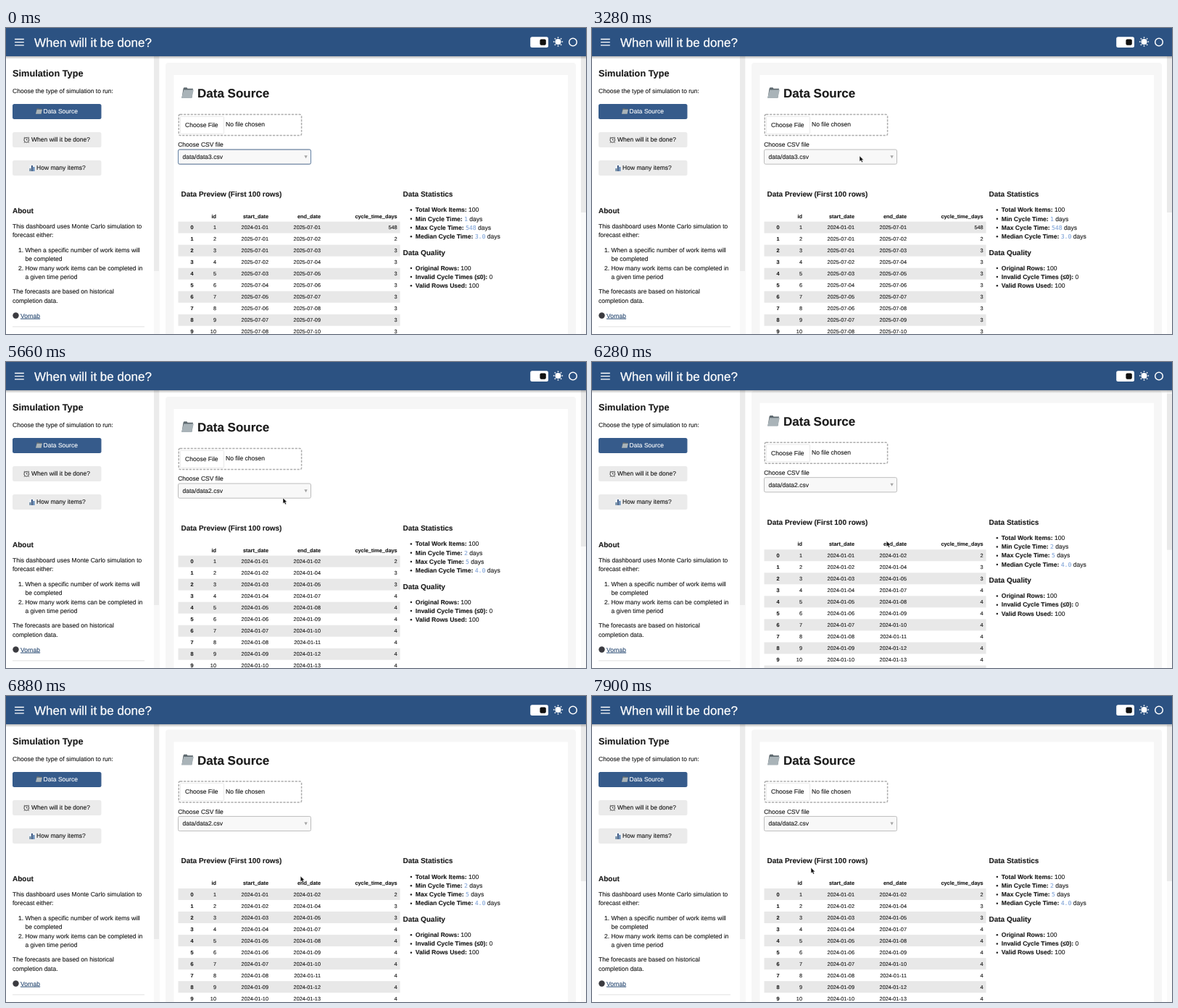
Recreate the animation shown at these times as an HTML page. Size 800x423 px, loop 8000 ms.

```html
<!DOCTYPE html>
<html lang="en">
<head>
<meta charset="utf-8">
<title>When will it be done?</title>
<style>
  html, body { margin: 0; width: 100%; height: 100%; overflow: hidden; background: #fff; }
  svg { display: block; width: 100%; height: 100%; }
  text {
    font: 8.54px "Liberation Sans", Arial, sans-serif; fill: #1a1a1a; stroke: #1a1a1a; stroke-width: .12px;
    white-space: pre; text-rendering: geometricPrecision;
  }
  .b { font-weight: 700; }
  .h1 { font-size: 17px; font-weight: 700; }
  .h2 { font-size: 12.75px; font-weight: 700; }
  .h3 { font-size: 10px; font-weight: 700; }
  .title { font-size: 17.05px; stroke-width: .25px; }
  .cell { font-size: 7.32px; text-anchor: end; }
  .code { font: 8.15px "DejaVu Sans Mono", monospace; fill: #82a5d8; stroke: #82a5d8; }
  .light { fill: #fff; stroke: #fff; }
  .link { fill: #2b4c74; stroke: #2b4c74; text-decoration: underline; }
</style>
</head>
<body>
<svg id="stage" viewBox="0 0 800 423" preserveAspectRatio="none"></svg>
<script>
const LOOP = 8000, DATA_SWITCH = 4930, ROW = 16.02, FIRST_ROW = 267.6;

const rect = (x, y, w, h, fill, r = 0, extra = '') =>
  `<rect x="${x}" y="${y}" width="${w}" height="${h}" fill="${fill}" rx="${r}" ${extra}/>`;
const text = (x, y, content, cls = '') => `<text x="${x}" y="${y}" class="${cls}">${content}</text>`;
const pad = n => String(n).padStart(2, '0');

const folder = (x, y, scale) => `<g transform="translate(${x} ${y}) scale(${scale})">
  <path d="M2.500 2 3.500 .5H7.500L8.500 2H16L14.500 14.500H.5Z" fill="#5f6a70"/>
  <path d="M3.200 3.800H16.800L14.300 15.200H0Z" fill="#a9b3b8"/></g>`;

const clock = `<g stroke="#444" fill="#f4f4f4"><circle cx="28.300" cy="154.800" r="3.400"/>
  <path d="M28.300 152.600V155H30.200M25.800 157.800 25 158.800M30.800 157.800 31.600 158.800M24.600 152.200 26 150.800M32 152.200 30.600 150.800" fill="none" stroke-width=".9"/></g>`;

const chart = rect(31.5, 189.5, 8.5, 8.5, '#eef2f5', .5) + rect(32.5, 194, 1.8, 4, '#4a6f8c') +
  rect(35, 190, 1.8, 8, '#2d4a78') + rect(37.5, 192, 1.8, 6, '#3f6fa5');

function sidebar() {
  const lines = [
    [9, 276.8, 'This dashboard uses Monte Carlo simulation to'], [9, 289.2, 'forecast either:'],
    [17, 310, '1.'], [26.4, 310, 'When a specific number of work items will'], [26.4, 322.4, 'be completed'],
    [17, 334.6, '2.'], [26.4, 334.6, 'How many work items can be completed in'], [26.4, 347, 'a given time period'],
    [9, 367.3, 'The forecasts are based on historical'], [9, 379.6, 'completion data.']
  ];
  return rect(0, 39, 212, 384, '#fff') + rect(204, 39, 8, 384, '#f8f8f8') + rect(204, 39, 7, 297, '#ebebeb') +
    text(9, 67.3, 'Simulation Type', 'h2') + text(9, 89.6, 'Choose the type of simulation to run:') +
    rect(9, 105, 122.5, 21, '#365b8b', 2.5) + folder(41, 110.8, .53) + text(51.5, 118.2, 'Data Source', 'light') +
    rect(9, 144, 122.5, 21, '#ebebeb', 2.5) + clock + text(35, 157.4, 'When will it be done?') +
    rect(9, 183, 122.5, 21, '#ebebeb', 2.5) + chart + text(42, 196.4, 'How many items?') +
    text(9, 255.8, 'About', 'h3') + lines.map(l => text(...l)).join('') +
    '<circle cx="13.500" cy="397.500" r="4.200" fill="#3b3b40"/>' + text(20, 400.6, 'Vornab', 'link') +
    rect(9, 412.4, 182, 1, '#e2e2e2');
}

function header() {
  const rays = Array.from({ length: 8 }, (_, i) =>
    `<path d="M0 -5V-6.600" transform="rotate(${i * 45})"/>`).join('');
  return rect(0, 39, 800, 4, 'url(#shade)') + rect(0, 0, 800, 39, '#2c5282') +
    '<path d="M12 15.500H24.800M12 19.700H24.800M12 23.900H24.800" stroke="#fff" stroke-width="1.300"/>' +
    text(39, 25.8, 'When will it be done?', 'title light') +
    rect(723.2, 12.2, 24.8, 14.8, '#fff', 2.5) + rect(736.4, 15.4, 8.4, 8.4, '#111', 2) +
    `<g transform="translate(761.500 19)" stroke="#fff" stroke-width="1.500"><circle r="3.300" fill="#fff"/>${rays}</g>` +
    '<circle cx="782" cy="19.500" r="5.300" fill="none" stroke="#fff" stroke-width="1.500"/>';
}

const recent = i => i === 0 ? ['2024-01-01', '2025-07-01', 548]
  : i === 1 ? ['2025-07-01', '2025-07-02', 2]
  : [`2025-07-${pad(i - 1)}`, `2025-07-${pad(i + 1)}`, 3];

const steady = i => {
  const days = [2, 3, 3][i] || 4;
  return [`2024-01-${pad(i + 1)}`, `2024-01-${pad(i + days)}`, days];
};

function dataset(id, file, rowOf, stats) {
  let out = text(243.5, 181, file);
  for (let i = 0; i < 11; i++) {
    const y = 278.3 + i * ROW, [start, end, days] = rowOf(i);
    out += text(258.6, y, i, 'cell b');
    [[290, i + 1], [362, start], [434, end], [539.6, days]].forEach(([x, v]) => out += text(x, y, v, 'cell'));
  }
  ['Min', 'Max', 'Median'].forEach((name, i) => out += text(564.8, 266.5 + i * 12.25,
    `<tspan class="b">${name} Cycle Time:</tspan> <tspan class="code">${stats[i]}</tspan> days`));
  return `<g id="${id}">${out}</g>`;
}

function mainPanel() {
  const bullet = y => `<circle cx="558.800" cy="${y - 2.700}" r="1.250" fill="#222"/>`;
  const item = (y, label, value) => text(564.8, y, `<tspan class="b">${label}</tspan> ${value}`);
  const heads = [[290, 'id'], [362, 'start_date'], [434, 'end_date'], [539.6, 'cycle_time_days']];
  const stripes = [0, 2, 4, 6, 8, 10].map(i => rect(237.5, FIRST_ROW + i * ROW, 306, ROW, '#e8e8e8')).join('');
  return rect(220, 48, 566, 400, '#f6f6f6', 4) + rect(231.5, 65, 543.5, 400, '#fff') +
    folder(242, 81.8, 1) + text(264, 96.3, 'Data Source', 'h1') +
    rect(238.3, 119.6, 169.3, 29, 'none', 2, 'stroke="#adadad" stroke-width="1.500" stroke-dasharray="3.200 1.600"') +
    rect(240.5, 122.3, 60, 24, '#fff', 1, 'stroke="#e4e4e4" stroke-width=".8"') +
    text(247, 136.9, 'Choose File') + text(303, 136.3, 'No file chosen') +
    text(237.2, 164.3, 'Choose CSV file') +
    rect(237.5, 168, 183, 20.2, '#f8f8f8', 2, 'stroke="#bdbdbd"') +
    rect(237.5, 168, 183, 20.2, 'none', 2, 'id="focus" stroke="#6482a6"') +
    '<path d="M411.400 176.200H415.800L413.600 180.200Z" fill="#a3a3a3"/>' +
    text(241.5, 233, 'Data Preview (First 100 rows)', 'h3') +
    heads.map(([x, s]) => text(x, 262.6, s, 'cell b')).join('') + stripes +
    rect(237.5, 0, 306, ROW, '#d5e9f8', 0, 'id="hover"') +
    text(547.5, 233, 'Data Statistics', 'h3') + text(547.5, 313.6, 'Data Quality', 'h3') +
    [254.2, 266.5, 278.7, 291, 334.6, 346.8, 359].map(bullet).join('') +
    item(254.2, 'Total Work Items:', 100) + item(334.6, 'Original Rows:', 100) +
    item(346.8, 'Invalid Cycle Times (≤0):', 0) + item(359, 'Valid Rows Used:', 100) +
    dataset('before', 'data/data3.csv', recent, ['1', '548', '3.0']) +
    dataset('after', 'data/data2.csv', steady, ['2', '5', '4.0']);
}

const $ = id => document.getElementById(id);
$('stage').innerHTML = `<defs><linearGradient id="shade" x2="0" y2="1">
  <stop stop-color="#000" stop-opacity=".28"/><stop offset="1" stop-color="#000" stop-opacity="0"/></linearGradient></defs>` +
  rect(0, 0, 800, 423, '#fff') + `<g id="main">${mainPanel()}</g>` +
  rect(793, 39, 7, 384, '#fafafa') + rect(793, 39, 7, 216, '#e9e9e9', 0, 'id="thumb"') +
  sidebar() + header() +
  '<path id="cursor" d="M0 0V7.800L1.800 6.200 3.100 9 4.600 8.300 3.300 5.600H5.700Z" fill="#111" stroke="#fff" stroke-width=".5"/>';

// Each key is [time, ...values]; values glide between keys.
function sample(keys, t) {
  const next = keys.findIndex(k => k[0] > t);
  if (next === 0) return keys[0].slice(1);
  if (next < 0) return keys[keys.length - 1].slice(1);
  const a = keys[next - 1], b = keys[next], p = (t - a[0]) / (b[0] - a[0]);
  const eased = p * p * (3 - 2 * p);
  return a.slice(1).map((v, i) => v + (b[i + 1] - v) * eased);
}

const pointerKeys = [
  [1070, 305, 420], [1510, 354, 164.5], [1790, 369, 176.8], [4930, 369, 176.8], [5660, 382, 188],
  [5740, 384, 191], [6080, 406.2, 246.5], [6540, 406.2, 249], [6880, 406.2, 249],
  [7590, 290, 377], [7693, 288, 330], [7796, 287, 270], [7899, 302, 237.3]
];
const scrollKeys = [[5740, 0], [6140, 8.4], [6380, 8.3], [6540, 1.6]];
const focusKeys = [[2040, 1], [2260, 0]];

function draw(t) {
  // The last pointer moves land in coarse steps.
  const pointerTime = t > 7590 ? 7590 + Math.floor((t - 7590) / 103) * 103 : t;
  const [x, y] = sample(pointerKeys, pointerTime);
  const [scroll] = sample(scrollKeys, t);
  const row = Math.floor((y + scroll - FIRST_ROW) / ROW);
  const hovering = t >= 6880 && row >= 0 && x > 237 && x < 544;

  $('main').setAttribute('transform', `translate(0 ${-scroll})`);
  $('thumb').setAttribute('y', 39 + scroll * .56);
  $('focus').setAttribute('opacity', sample(focusKeys, t)[0]);
  $('before').style.display = t < DATA_SWITCH ? '' : 'none';
  $('after').style.display = t < DATA_SWITCH ? 'none' : '';
  $('hover').style.display = hovering ? '' : 'none';
  $('hover').setAttribute('y', FIRST_ROW + row * ROW);
  $('cursor').style.display = t < 1070 ? 'none' : '';
  $('cursor').setAttribute('transform', `translate(${x} ${y})`);
}

const began = performance.now();
function frame() {
  draw((performance.now() - began) % LOOP);
  requestAnimationFrame(frame);
}
frame();
</script>
</body>
</html>
```
